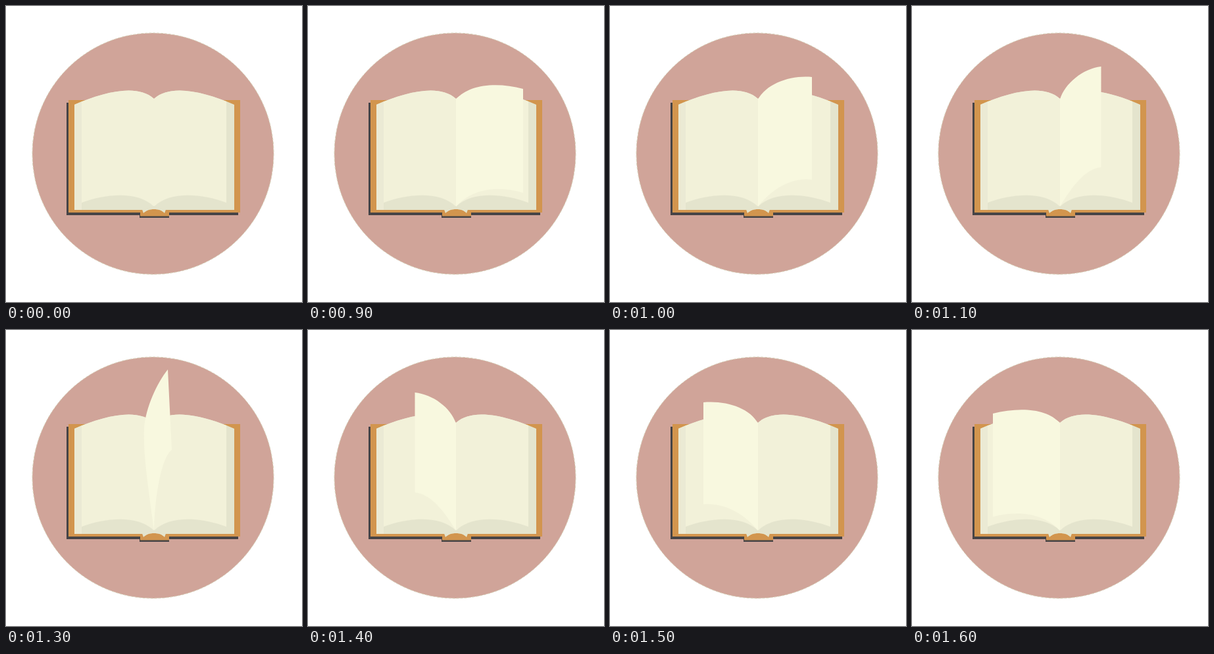
An HTML page without scripts that plays this animation: 450x450 px, repeating every 1.7 s.

```html
<!DOCTYPE html>
<html lang="en">
<head>
<meta charset="utf-8">
<title>Turning page</title>
<style>
  html, body { margin: 0; width: 100%; height: 100%; overflow: hidden; background: #fff; }
  svg { display: block; width: 100%; height: 100%; }
  .cover { fill: #d2954e; }
  .dark { fill: #464446; }
  .under { fill: #e4e4cd; }
  .paper { fill: #f2f1d9; }
  /* each pose shows for 100 ms, beginning at --at */
  .turn path {
    fill: #f8f8df;
    visibility: hidden;
    animation: pose 1700ms step-end calc(var(--at) - 1700ms) infinite;
  }
  @keyframes pose {
    0% { visibility: visible; }
    5.88235%, 100% { visibility: hidden; }
  }
</style>
</head>
<body>
<svg viewBox="0 0 450 450">
  <defs>
    <clipPath id="block">
      <path d="M104 150C150 130 200 118 225 141C250 118 301 130 347 150V310H104Z"/>
    </clipPath>
  </defs>

  <circle cx="223.5" cy="224.5" r="183.5" fill="#d0a499"/>
  <circle cx="223.5" cy="224.5" r="183.5" fill="none" stroke="#d6d0b8" stroke-dasharray="4 2"/>

  <path class="dark" d="M92 147H353V318H248V322H203V318H92Z"/>
  <path class="cover" d="M95 143H356V314H248V319.500H204V314H95Z"/>

  <g clip-path="url(#block)">
    <path class="under" d="M104 120H347V310H104Z"/>
    <path fill="#ebead4" d="M104 120H115V310H104Z"/>
    <path class="paper" d="M115 120H335V299C295 284 248 282 225 305C202 282 155 284 115 299Z"/>
  </g>
  <path class="under" d="M207 309.500L225 304L243 309.500L241 315C234 307 217 307 209 315Z"/>
  <path class="cover" d="M210 315C216 307 234 307 240 315Z"/>

  <g class="turn">
    <path style="--at:900ms" d="M225 142C244 119 287 115 327 126V284C290 273 250 277 225 305Z"/>
    <path style="--at:1000ms" d="M225 142C238 118 274 105 307 108V264C276 260 246 278 225 305Z"/>
    <path style="--at:1100ms" d="M225 142C232 118 260 95 287.500 92V245C262 247 240 280 225 305Z"/>
    <path style="--at:1200ms" d="M225 305C223 250 219 190 220 145C223 118 243 86 265 73L268 214C246 229 231 272 225 305Z"/>
    <path style="--at:1300ms" d="M225 305C218 250 208 190 210 150C212 118 230 80 246 60L252 182C236 194 226 254 225 305Z"/>
    <path style="--at:1400ms" d="M225 142C217 118 190 98 162.500 95V247C188 249 210 280 225 305Z"/>
    <path style="--at:1500ms" d="M225 142C212 118 176 107 142 110V265C174 262 204 279 225 305Z"/>
    <path style="--at:1600ms" d="M225 142C206 119 163 117 123 127V284C160 274 200 278 225 305Z"/>
  </g>
</svg>
</body>
</html>
```
